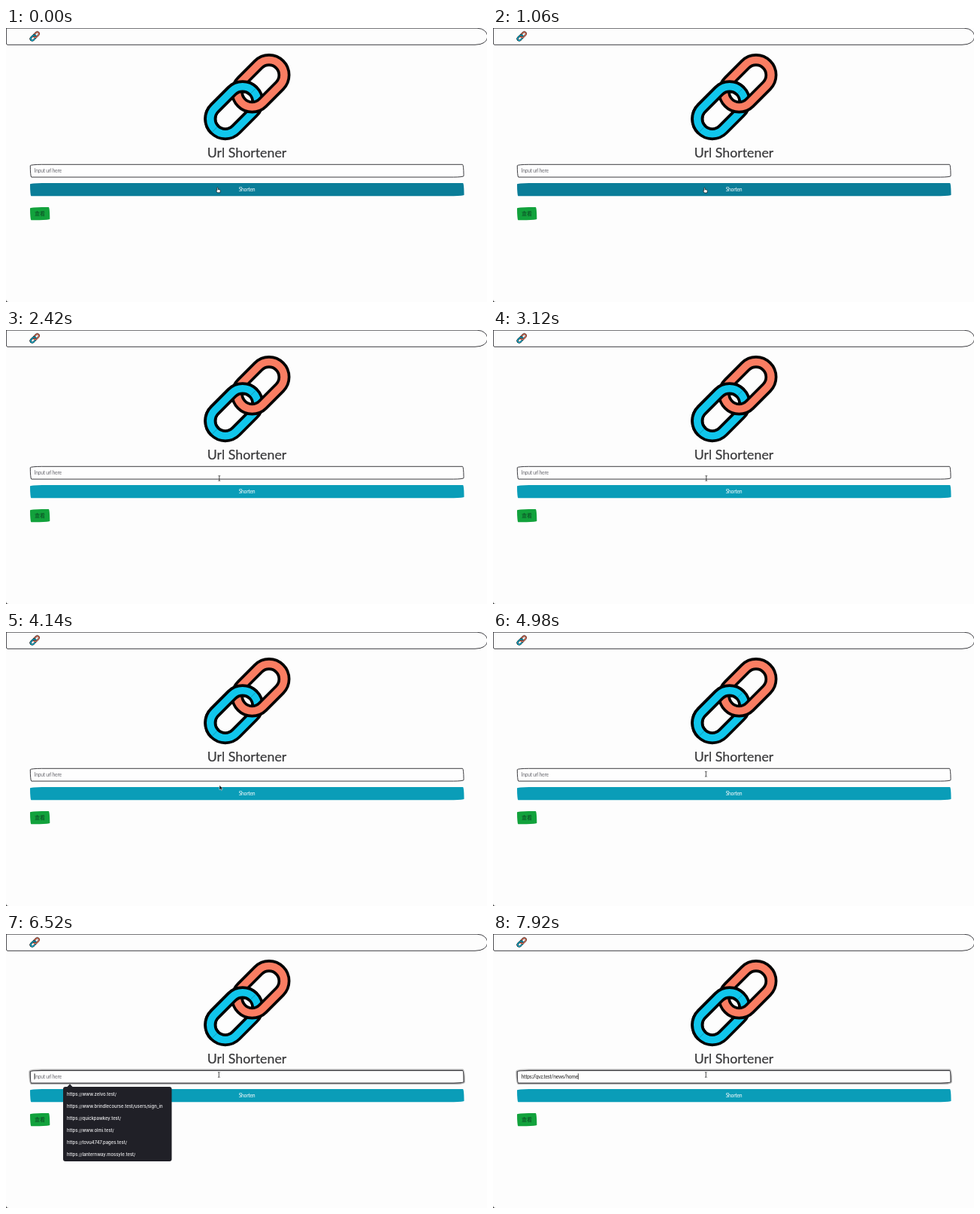
An HTML page for the animation above (8000 ms loop, 640 px wide and 364 px high).

```html
<!DOCTYPE html>
<html lang="en">
<head>
<meta charset="utf-8">
<title>Url Shortener</title>
<style>
  html, body { margin: 0; width: 100%; height: 100%; overflow: hidden; background: #fdfdfd; }
  svg { display: block; width: 100%; height: 100%; }
  text { font-family: Lato, "Open Sans", sans-serif; font-size: 6.8px; letter-spacing: -.3px; white-space: pre; }
  #title { font-size: 17.8px; letter-spacing: 0; }
  #badgeText { font: 7px "Noto Sans CJK TC", "Noto Sans CJK SC", sans-serif; letter-spacing: 0; }
  #popup text { font: 500 5.9px Inter, "Liberation Sans", sans-serif; letter-spacing: 0; fill: #f0f0f2; }
</style>
</head>
<body>
<svg viewBox="0 0 640 364" preserveAspectRatio="none">
  <defs>
    <clipPath id="upperLeft"><path d="M250 162.5L400 12.5H250Z"/></clipPath>
    <g id="chain" fill="none">
      <g id="cyan">
        <path class="link" d="" stroke="#000" stroke-width="17"/>
        <path class="link" d="" stroke="#10c6ec" stroke-width="9.6"/>
      </g>
      <g id="orange">
        <path class="link" d="" stroke="#000" stroke-width="17"/>
        <path class="link" d="" stroke="#fa7d62" stroke-width="9.6"/>
      </g>
      <use href="#cyan" clip-path="url(#upperLeft)"/>
    </g>
  </defs>

  <rect width="640" height="364" fill="#fdfdfd"/>
  <path d="M0 .2H627Q639 1 641 11Q640 22 624 22.3H2Q.4 22 .4 20V0" fill="none" stroke="#3c3c40"/>
  <path d="M0 360.5Q0 364 3.5 364H0Z" fill="#222"/>

  <use href="#chain"/>
  <use href="#chain" transform="translate(38.3 11) scale(.115) translate(-321 -91.5)"/>

  <text id="title" x="320.5" y="172.3" text-anchor="middle" fill="#38383a" stroke="#38383a" stroke-width=".2">Url Shortener</text>

  <path id="glow" fill="none" stroke="#333" stroke-width="4"/>
  <path id="field" fill="#fefefe" stroke="#3c3c40"/>
  <text id="value" x="37.6" y="191.8"></text>
  <path id="caret" stroke="#222" stroke-width=".8"/>

  <path id="button"/>
  <text x="320.5" y="216.6" text-anchor="middle" fill="#fff">Shorten</text>
  <path id="badge" fill="#12a23c"/>
  <text id="badgeText" x="45" y="249" text-anchor="middle" fill="#0c4624">查看</text>

  <g id="popup">
    <path d="M81 203.5L85 199.3L89 203.5Z" fill="#202027"/>
    <rect x="76" y="203" width="144.5" height="99" rx="3" fill="#202027"/>
  </g>

  <g id="cursor">
    <path id="arrow" d="M0 0V6.2L1.5 4.9L2.5 7L3.5 6.5L2.6 4.5L4.4 4.3Z" fill="#000" stroke="#fff" stroke-width=".5"/>
    <path id="beam" d="M-1.3 -3.4Q0 -3.4 0 -2.6Q0 -3.4 1.3 -3.4M0 -2.6V2.6M-1.3 3.4Q0 3.4 0 2.6Q0 3.4 1.3 3.4" fill="none" stroke="#222" stroke-width=".8"/>
    <path id="hand" d="M-.7 .4Q0 -.5 .6 .4V2.6L3.2 3.2Q4 3.6 3.8 4.6L3.3 7H-.2L-2 4.4Q-2 3.5 -.7 4.2Z" fill="#fff" stroke="#111" stroke-width=".7"/>
  </g>
</svg>
<script>
const LOOP = 8000;
const LEAVE = 1990, FOCUS = 5760, POPUP = 6020, PASTE = 7880;
const HOVER = [10, 125, 152], IDLE = [10, 157, 184];
const URL_TEXT = "https://qvz.test/news/home";
const SUGGESTIONS = [
  "https://www.zelvo.test/",
  "https://www.brindlecourse.test/users/sign_in",
  "https://quickpawkey.test/",
  "https://www.olmi.test/",
  "https://tovu4747.pages.test/",
  "https://lanternway.mossyle.test/"
];
// Pointer hotspot: time, x, y
const POINTER = [
  [0, 281.5, 211.8], [280, 281, 211.5], [500, 281, 211.5], [780, 279.8, 212.8],
  [1060, 281.5, 212], [1700, 281.5, 212], [2000, 283.5, 202.6], [2400, 283.8, 197],
  [3680, 283.8, 197], [4100, 284, 203.6], [4520, 284, 203.6], [5100, 283.3, 187],
  [LOOP, 283.3, 187]
];

const $ = id => document.getElementById(id);
const clamp = v => Math.max(0, Math.min(1, v));
const show = (el, on) => el.setAttribute("visibility", on ? "visible" : "hidden");

// Hand-drawn box: long shallow corners alternate with short steep ones
function sketchBox(x, y, w, h) {
  const f = Math.min(w, h) / 280, r = x + w, b = y + h;
  const [tlx, trx, brx, blx] = [255, 25, 225, 25].map(v => v * f);
  const [tly, try_, bry, bly] = [25, 225, 25, 255].map(v => v * f);
  return `M${x + tlx} ${y}H${r - trx}A${trx} ${try_} 0 0 1 ${r} ${y + try_}` +
    `V${b - bry}A${brx} ${bry} 0 0 1 ${r - brx} ${b}` +
    `H${x + blx}A${blx} ${bly} 0 0 1 ${x} ${b - bly}` +
    `V${y + tly}A${tlx} ${tly} 0 0 1 ${x + tlx} ${y}Z`;
}

// Capsule outline around a diagonal running from lower left to upper right
function capsule(x, y, length) {
  const r = 20, d = r * Math.SQRT1_2;
  return `M${x - d} ${y - d}l${length} ${-length}a${r} ${r} 0 0 1 ${2 * d} ${2 * d}` +
    `l${-length} ${length}a${r} ${r} 0 0 1 ${-2 * d} ${-2 * d}Z`;
}

function setLink(id, d) {
  document.querySelectorAll(`#${id} .link`).forEach(p => p.setAttribute("d", d));
}

function build() {
  setLink("cyan", capsule(291.8, 120.7, 23));
  setLink("orange", capsule(327.5, 85, 22.5));
  const field = sketchBox(32.3, 181.3, 576.7, 16.8);
  $("field").setAttribute("d", field);
  $("glow").setAttribute("d", field);
  $("button").setAttribute("d", sketchBox(32, 206, 577.5, 17.3));
  $("badge").setAttribute("d", sketchBox(32, 238, 26.3, 17.3));
  SUGGESTIONS.forEach((s, i) => {
    const t = document.createElementNS("http://www.w3.org/2000/svg", "text");
    t.setAttribute("x", 81);
    t.setAttribute("y", 214.5 + 16 * i);
    t.textContent = s;
    $("popup").append(t);
  });
}

function pointerAt(t) {
  const i = Math.max(1, POINTER.findIndex(k => k[0] >= t));
  const a = POINTER[i - 1], b = POINTER[i];
  const u = clamp((t - a[0]) / (b[0] - a[0])), e = u * u * (3 - 2 * u);
  return [a[1] + (b[1] - a[1]) * e, a[2] + (b[2] - a[2]) * e];
}

function draw(t) {
  const [x, y] = pointerAt(t);
  $("cursor").setAttribute("transform", `translate(${x} ${y})`);
  show($("hand"), y > 206);
  show($("beam"), y < 198.5);
  show($("arrow"), y >= 198.5 && y <= 206);

  const fade = clamp((t - LEAVE) / 150);
  const rgb = HOVER.map((h, i) => Math.round(h + (IDLE[i] - h) * fade));
  $("button").setAttribute("fill", `rgb(${rgb})`);

  const focus = clamp((t - FOCUS) / 150), pasted = t >= PASTE;
  $("glow").setAttribute("stroke-opacity", 0.3 * focus);
  $("field").setAttribute("stroke-width", 1 + 0.2 * focus);

  const value = $("value");
  value.textContent = pasted ? URL_TEXT : "Input url here";
  value.setAttribute("fill", pasted ? "#222" : "#6c6c72");
  const cx = pasted ? 38 + value.getComputedTextLength() : 38;
  $("caret").setAttribute("d", `M${cx} 185.3V193.3`);
  const blinkOn = t < 6700 || Math.floor((t - 6700) / 500) % 2 === 1;
  show($("caret"), t >= FOCUS && (pasted || blinkOn));
  show($("popup"), t >= POPUP && !pasted);
}

build();
const start = performance.now();
function tick() {
  draw((performance.now() - start) % LOOP);
  requestAnimationFrame(tick);
}
tick();
</script>
</body>
</html>
```
